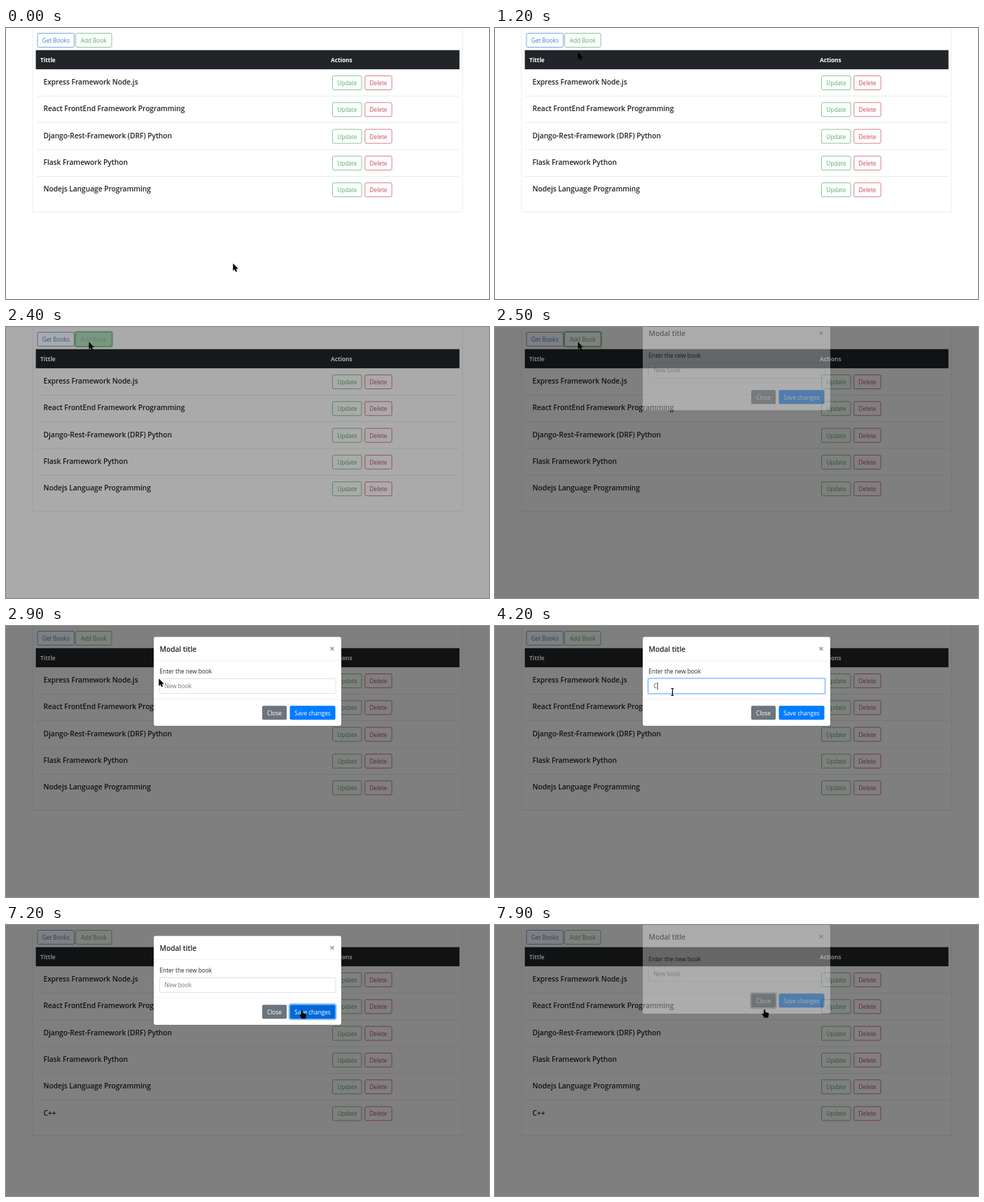
An HTML page for the animation above (8000 ms loop, 690x388 px).

```html
<!DOCTYPE html>
<html lang="en">
<head>
<meta charset="utf-8">
<title>Books</title>
<style>
html, body { margin: 0; width: 100%; height: 100%; overflow: hidden; background: #fff; }
svg { display: block; }
text { font: 8.3px "Open Sans", "Noto Sans", sans-serif; letter-spacing: -.04px; fill: #212529; white-space: pre; }
.mid { text-anchor: middle; }
.head { font-weight: 700; fill: #fff; }
.big { font-size: 10.3px; font-weight: 600; letter-spacing: -.08px; }
.field { fill: #495057; }
.hint { fill: #6c757d; }
.white { fill: #fff; }
</style>
</head>
<body>
<svg id="stage" width="690" height="388" viewBox="0 0 690 388"></svg>
<script>
const LOOP = 8000, STEP = 100, ROW = 38.3;
const GREEN = '#28a745', BLUE = '#007bff', GREY = '#6c757d';
// softer tones of the outlined buttons
const LEAF = [84, 176, 104], ROSE = [204, 70, 96], SKY = [58, 130, 214], WHITE = [255, 255, 255];
const books = ['Express Framework Node.js', 'React FrontEnd Framework Programming',
  'Django-Rest-Framework (DRF) Python', 'Flask Framework Python',
  'Nodejs Language Programming', 'C++'];

const text = (x, y, s, cls = '', more = '') => `<text x="${x}" y="${y}" class="${cls}" ${more}>${s}</text>`;
const box = (x, y, w, h, more) => `<rect x="${x}" y="${y}" width="${w}" height="${h}" ${more}/>`;
const line = (x, y, w, color) => box(x, y, w, .6, `fill="${color}"`);
const ring = (id, x, y, w, h, color) => box(x - 1, y - 1, w + 2, h + 2,
  `id="${id}" rx="2.6" fill="none" stroke="${color}" stroke-width="1.7" opacity="0"`);

function outlined(x, y, w, label, tone, id = '') {
  const color = `rgb(${tone})`;
  return box(x, y, w, 20, `id="${id}" rx="2" fill="${GREEN}" fill-opacity="0" stroke="${color}" stroke-width=".7"`) +
    text(x + w / 2, y + 13.4, label, 'mid', `id="${id}Label" style="fill:${color}"`);
}

function solid(x, y, w, label, color, id) {
  return ring(id + 'Ring', x, y, w, 20, color + '80') +
    box(x, y, w, 20, `id="${id}" rx="2" fill="${color}"`) +
    text(x + w / 2, y + 13.3, label, 'mid white');
}

function row(title, i) {
  const y = 59 + i * ROW;
  return `<g id="row${i}">` + (i ? line(43, y - .2, 605, '#dadee2') : '') +
    text(53.5, y + 22, title, 'big') +
    outlined(466.5, y + 9.5, 41.5, 'Update', LEAF) +
    outlined(512.8, y + 9.5, 38.4, 'Delete', ROSE) + '</g>';
}

const page = box(38, -4, 614, 267.5, 'id="card" fill="#fff" stroke="#dfdfdf" stroke-width=".6"') +
  outlined(45, 7.5, 52.5, 'Get Books', SKY) +
  ring('addRing', 99.5, 7.5, 51.5, 20, GREEN + '80') +
  outlined(99.5, 7.5, 51.5, 'Add Book', LEAF, 'add') +
  box(42.6, 31.7, 605.2, 27.4, 'fill="#212529"') +
  text(49, 48.8, 'Tittle', 'head') + text(464, 48.8, 'Actions', 'head') +
  books.map(row).join('');

const modal = '<g id="modal">' +
  box(211, 15.5, 268, 127.5, 'rx="2.4" fill="#fff" stroke="#000" stroke-opacity=".2" stroke-width=".5"') +
  text(219.5, 36.6, 'Modal title', 'big') +
  text(466, 36.6, '×', 'mid', 'style="font-size:13px;font-weight:700;opacity:.5"') +
  line(211, 49.3, 268, '#e9ecef') +
  text(219.5, 68.2, 'Enter the new book') +
  ring('inputRing', 219.3, 75.5, 251.7, 21, BLUE + '55') +
  box(219.3, 75.5, 251.7, 21, 'id="input" rx="2" fill="#fff" stroke-width=".7"') +
  text(226.5, 89.3, 'New book', 'hint', 'id="hint"') +
  text(226.5, 89.3, '', 'field', 'id="typed"') +
  box(0, 80.5, .8, 11, 'id="caret" fill="#222"') +
  line(211, 104.3, 268, '#e9ecef') +
  solid(366, 114.2, 35, 'Close', GREY, 'close') +
  solid(405.5, 114.2, 65, 'Save changes', BLUE, 'save') + '</g>';

const pointers = {
  arrow: '<path d="M0 0V9.8L2.2 7.8 3.8 11.4 5.4 10.7 3.9 7.2H6.9Z" stroke="#000" stroke-width=".4"/>',
  beam: '<path d="M-2-5H-.5L0-4.5 .5-5H2M0-4.5V4.5M-2 5H-.5L0 4.5 .5 5H2" fill="none" stroke="#000" stroke-width="1.2"/>',
  hand: '<path d="M-1 .8Q0-.8 1 .8V4L5 4.8Q6 5 6 6.2L5.2 10V11.5H-.8V10L-3.3 6.8Q-3.4 5.3-2 5.8L-1 6.8Z" stroke="#000" stroke-width=".4"/>'
};

const stage = document.getElementById('stage');
stage.innerHTML = page + box(0, 0, 690, 388, 'id="shade"') + modal +
  Object.entries(pointers).map(([k, p]) => `<g id="${k}">${p}</g>`).join('');

const el = id => document.getElementById(id);
const set = (id, name, value) => el(id).setAttribute(name, value);
const show = (id, on) => set(id, 'visibility', on ? 'visible' : 'hidden');
const ramp = (t, start, len) => Math.min(1, Math.max(0, (t - start) / len));
const pulse = (t, on, off) => ramp(t, on, 150) - ramp(t, off, 150);
const easeOut = p => 1 - (1 - p) ** 1.75;
const mix = (a, b, p) => a + (b - a) * p;
const blend = (a, b, p) => `rgb(${a.map((v, i) => mix(v, b[i], p))})`;

// time, x, y of the pointer
const path = [[100, 324.5, 337.5], [400, 333, 292], [1000, 118.5, 42], [1500, 118.7, 21.7],
  [2500, 118.7, 21.7], [3100, 253.5, 94.5], [6100, 253.5, 94.5], [6200, 254.5, 94.5],
  [6700, 436, 123], [7050, 436, 123], [7500, 385, 121], [8000, 385, 121]];
const blinks = [3400, 4200, 5000, 5200, 6200];

function pointerAt(t) {
  const i = path.findIndex(k => k[0] > t);
  if (i < 1) return path[0].slice(1);
  const [a, b] = [path[i - 1], path[i]];
  const p = ramp(t, a[0], b[0] - a[0]), s = p * p * (3 - 2 * p);
  return [mix(a[1], b[1], s), mix(a[2], b[2], s)];
}

function drawPage(t) {
  const hover = pulse(t, 1200, 2300), saved = t >= 7100;
  set('add', 'fill-opacity', hover);
  el('addLabel').style.fill = blend(LEAF, WHITE, hover);
  set('addRing', 'opacity', pulse(t, 1650, 2500));
  show('row5', saved);
  set('card', 'height', 267.5 + (saved ? ROW : 0));
  set('shade', 'opacity', .5 * ramp(t, 2300, 150));
}

function drawModal(t) {
  const lift = 1 - easeOut(ramp(t, 2480, 300)) + easeOut(ramp(t, 7780, 300));
  set('modal', 'opacity', pulse(t, 2447, 7803));
  set('modal', 'transform', `translate(0 ${-26.9 * lift})`);

  const focus = pulse(t, 3200, 6750);
  set('inputRing', 'opacity', focus);
  set('input', 'stroke', blend([206, 212, 218], [128, 189, 255], focus));
  const value = t < 4200 || t >= 7100 ? '' : t < 5000 ? 'C' : t < 5200 ? 'C+' : 'C++';
  el('typed').textContent = value;
  show('hint', !value);
  const last = blinks.filter(b => b <= t).pop();
  show('caret', last && t - last < 500 && t < 6750);
  set('caret', 'x', [226.6, 231.8, 237.8, 243.4][value.length]);

  set('saveRing', 'opacity', pulse(t, 6750, 7650));
  set('save', 'fill', blend([0, 123, 255], [0, 105, 217], pulse(t, 6600, 7200)));
  set('closeRing', 'opacity', ramp(t, 7650, 150));
  set('close', 'fill', blend([108, 117, 125], [90, 98, 104], ramp(t, 7350, 150)));
}

function drawPointer(t) {
  const [x, y] = pointerAt(t);
  const over = (l, r, top, bottom) => x > l && x < r && y > top && y < bottom;
  let kind = 'arrow';
  if (t > 2600 && over(219, 471, 75, 97)) kind = 'beam';
  if (t > 6200 && (over(366, 401, 114, 134) || over(405, 471, 114, 134))) kind = 'hand';
  for (const k in pointers) show(k, k === kind);
  set(kind, 'transform', `translate(${x} ${y})`);
}

function draw(now) {
  const t = Math.floor(now % LOOP / STEP) * STEP;
  drawPage(t);
  drawModal(t);
  drawPointer(t);
}

const start = performance.now();
function tick() {
  draw(performance.now() - start);
  requestAnimationFrame(tick);
}
tick();
</script>
</body>
</html>
```
